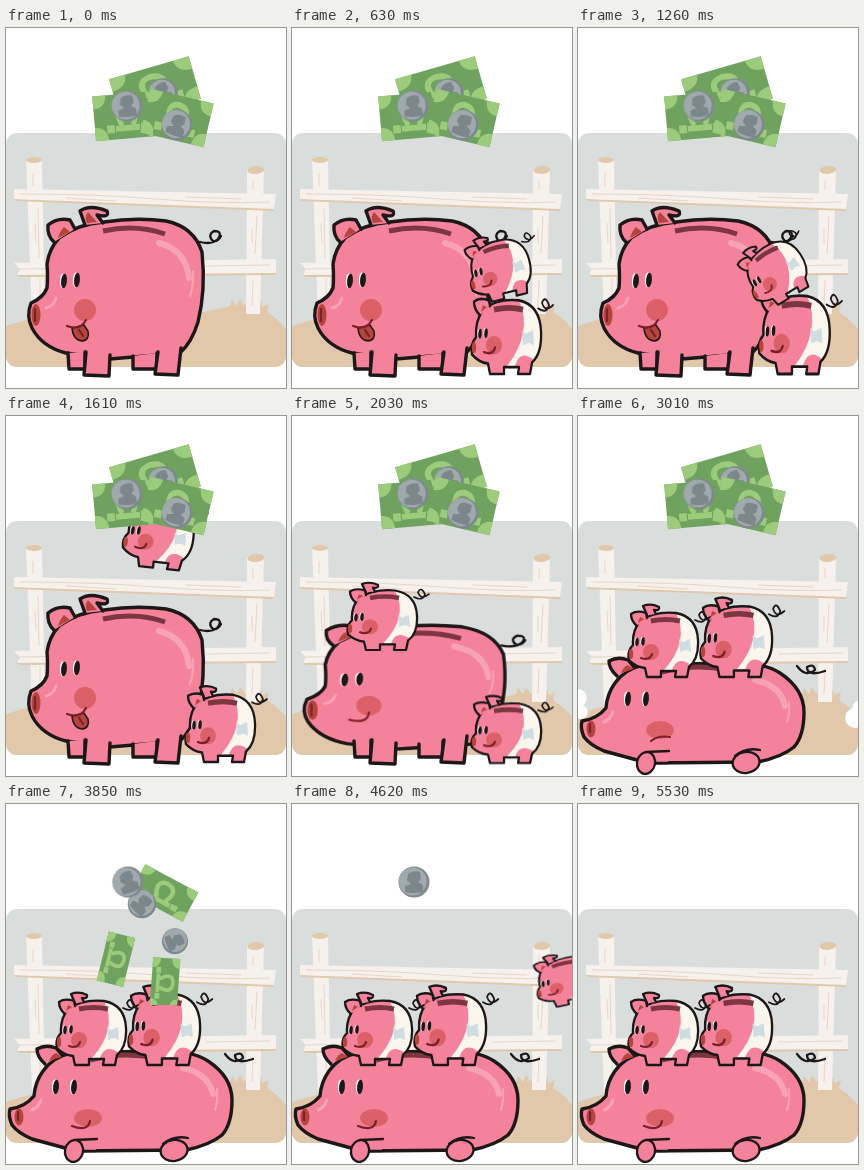
An HTML page that plays this animation: 280 by 360 pixels, repeating every 5.6 s.

```html
<!DOCTYPE html>
<html lang="en">
<head>
<meta charset="utf-8">
<title>Piggy banks</title>
<style>
html, body { margin: 0; width: 100%; height: 100%; overflow: hidden; background: #fff; }
svg { display: block; width: 100vw; height: 100vh; }
.ink { fill: none; stroke: #1d1718; stroke-width: 3.4; stroke-linecap: round; stroke-linejoin: round; }
.mom path { vector-effect: non-scaling-stroke; }
.thin { stroke-width: 2.3; }
.fine { stroke-width: 1.7; }
.skin { fill: #f5829b; }
.cheek { fill: #dc6068; }
.dark { fill: #b5443c; }
.slot { fill: none; stroke: #7c3640; stroke-width: 5; }
.shine { fill: none; stroke: #f7a3b5; stroke-linecap: round; }
.grin { fill: none; stroke: #7a2028; stroke-width: 2.2; stroke-linecap: round; }
.wood { fill: #f6f1ed; }
.sand { fill: #e1c8ab; }
.grain { fill: none; stroke: #e6d6c6; stroke-width: 1; }

.anim { animation: 5.6s linear infinite; }
.cut { animation-timing-function: step-end; }
.early { animation-name: early; }
.late { animation-name: late; }
.tongue { animation-name: tongue; }
.smile { animation-name: smile; }
.frown { animation-name: frown; }
.happy { animation-name: happy; }
.squash { animation-name: squash; transform-origin: 0 348px; }
.flop { animation-name: flop; transform-origin: 115px 352px; }
.one { animation-name: one; }
.two { animation-name: two; }
.three { animation-name: three; }
.puffL { animation-name: puffL; }
.puffR { animation-name: puffR; }
.n1 { animation-name: n1; } .n2 { animation-name: n2; } .n3 { animation-name: n3; }
.c1 { animation-name: c1; } .c2 { animation-name: c2; } .c3 { animation-name: c3; }

/* 1.25% is one 70 ms step */
@keyframes early { 0% { opacity: 1 } 46.25%, 100% { opacity: 0 } }
@keyframes late { 0% { opacity: 0 } 46.25%, 100% { opacity: 1 } }
@keyframes tongue { 0% { opacity: 1 } 32.5%, 100% { opacity: 0 } }
@keyframes smile { 0% { opacity: 0 } 32.5%, 100% { opacity: 1 } }
@keyframes frown { 0% { opacity: 1 } 61.25%, 100% { opacity: 0 } }
@keyframes happy { 0% { opacity: 0 } 61.25%, 100% { opacity: 1 } }

@keyframes squash {
  0%, 32.5% { translate: 0 0; scale: 1 1 }
  35% { translate: -28px 0; scale: 1.26 .8 }
  36.25%, 42.5% { translate: -14px 0; scale: 1.15 .885 }
  45%, 100% { translate: -20px 0; scale: 1.2 .86 }
}
@keyframes flop {
  0%, 46.25% { scale: 1.02 .9 }
  48.75% { scale: .99 1.05 }
  51.25%, 100% { scale: 1 1 }
}
@keyframes one {
  0% { translate: 330px 346px; scale: 1 1.15 }
  5% { translate: 262px 336px; scale: 1 1.15 }
  7.5% { translate: 232px 346px; scale: 1.06 1 }
  11.25% { translate: 215px 346px; scale: 1 1.15 }
  17.5% { translate: 222px 346px; scale: 1.03 1.08 }
  22.5% { translate: 217px 346px; scale: 1.02 1.22 }
  25% { translate: 215px 346px; scale: 1.06 .85 }
  28.75% { translate: 215px 346px; scale: 1 1.05 }
  36.25% { translate: 215px 347px; scale: 1 .93 }
  38.75% { translate: 215px 347px; scale: 1.12 .75 }
  40% { translate: 203px 290px; scale: .95 1.12; animation-timing-function: ease-out }
  42.5% { translate: 180px 186px; scale: 1 1; animation-timing-function: ease-in }
  45% { translate: 160px 234px; scale: 1 1.08 }
  46.25% { translate: 160px 262px; scale: 1.1 .82; animation-timing-function: ease-out }
  48.75% { translate: 160px 236px; scale: 1 1.08; animation-timing-function: ease-in }
  51.25% { translate: 160px 262px; scale: 1.1 .9 }
  53.75%, 100% { translate: 159px 261px; scale: 1.03 1.1 }
}
@keyframes two {
  0% { translate: 330px 270px; rotate: 0deg; scale: .9 }
  5% { translate: 262px 262px; rotate: 8deg; scale: .9 }
  7.5% { translate: 232px 276px; rotate: -6deg; scale: .9 }
  11.25% { translate: 215px 270px; rotate: -14deg; scale: .9 }
  17.5% { translate: 224px 274px; rotate: 6deg; scale: .9 }
  22.5% { translate: 213px 269px; rotate: -31deg; scale: .88 }
  25% { translate: 213px 284px; rotate: -10deg; scale: 1.08 .8; animation-timing-function: ease-out }
  28.75% { translate: 150px 152px; rotate: 6deg; scale: 1; animation-timing-function: ease-in }
  33.75% { translate: 92px 234px; rotate: 0deg; scale: .98 1.04 }
  35% { translate: 92px 242px; rotate: 0deg; scale: 1.12 .78 }
  36.25%, 42.5% { translate: 91px 234px; rotate: 0deg; scale: 1 .93 }
  45% { translate: 90px 238px; rotate: 0deg; scale: 1 }
  46.25% { translate: 87px 261px; rotate: 0deg; scale: 1.1 .82; animation-timing-function: ease-out }
  48.75% { translate: 87px 229px; rotate: 0deg; scale: 1 1.02; animation-timing-function: ease-in }
  51.25% { translate: 87px 261px; rotate: 0deg; scale: 1.08 .9 }
  53.75%, 100% { translate: 86px 261px; rotate: 0deg; scale: 1 }
}
@keyframes three {
  0%, 80% { translate: 345px 236px; rotate: -16deg; scale: .88 .72 }
  82.5% { translate: 280px 200px; rotate: -12deg; scale: .88 .72 }
  87.5% { translate: 150px 163px; rotate: 0deg; scale: .88 }
  90% { translate: 97px 166px; rotate: 0deg; scale: .88 }
  98.75%, 100% { translate: -50px 202px; rotate: -8deg; scale: .88 }
}
@keyframes puffL {
  0%, 46.24% { translate: 50px 330px; scale: 0 }
  46.25% { translate: 40px 326px; scale: .6 }
  53.75% { translate: 0 289px; scale: 1 }
  56.25%, 100% { translate: -24px 280px; scale: 1 }
}
@keyframes puffR {
  0%, 46.24% { translate: 220px 335px; scale: 0 }
  46.25% { translate: 225px 332px; scale: .6 }
  53.75% { translate: 283px 300px; scale: 1 }
  56.25%, 100% { translate: 306px 292px; scale: 1 }
}
@keyframes n1 {
  0%, 57.5% { translate: 149px 61px; rotate: -16deg; scale: 1.38 1.3 }
  68.75% { translate: 158px 89px; rotate: 28deg; scale: 1 .98; animation-timing-function: ease-in }
  77.5%, 100% { translate: 160px 235px; rotate: 90deg; scale: .84 .8 }
}
@keyframes n2 {
  0%, 57.5% { translate: 121px 88px; rotate: -5deg; scale: 1.1 1.32 }
  68.75% { translate: 110px 155px; rotate: 104deg; scale: .84 .8 }
  75%, 100% { translate: 89px 235px; rotate: 90deg; scale: .84 .8 }
}
@keyframes n3 {
  0%, 57.5% { translate: 171px 90px; rotate: 13deg; scale: 1.08 1.32 }
  68.75% { translate: 159px 179px; rotate: 94deg; scale: .84 .8 }
  72.5%, 100% { translate: 159px 235px; rotate: 90deg; scale: .84 .8 }
}
@keyframes c1 {
  0%, 57.5% { translate: 121px 78px; rotate: -4deg; opacity: 1 }
  68.75% { translate: 122px 78px; rotate: -20deg; opacity: 1 }
  77.5%, 85% { translate: 122px 78px; rotate: 0deg; opacity: 1; animation-timing-function: ease-in }
  88.74% { translate: 122px 118px; rotate: 0deg; opacity: 1 }
  88.75%, 100% { translate: 122px 118px; rotate: 0deg; opacity: 0 }
}
@keyframes c2 {
  0%, 57.5% { translate: 171px 97px; rotate: 18deg; scale: 1 }
  68.75% { translate: 169px 137px; rotate: 70deg; scale: .84 }
  73.75%, 100% { translate: 160px 220px; rotate: 130deg; scale: .84 }
}
@keyframes c3 {
  0%, 57.5% { translate: 157px 65px; rotate: -20deg; scale: .95 }
  68.75% { translate: 136px 100px; rotate: 45deg; scale: .92; animation-timing-function: ease-in }
  77.5%, 100% { translate: 90px 222px; rotate: 150deg; scale: .84 }
}
</style>
</head>
<body>
<svg viewBox="0 0 280 360">
  <defs>
    <clipPath id="card"><rect y="105" width="280" height="234" rx="11"/></clipPath>
    <clipPath id="above"><rect width="280" height="201"/></clipPath>

    <g id="eye">
      <ellipse cx="-1.2" rx="2.9" ry="7.4" fill="#fff"/>
      <ellipse rx="2.9" ry="7.2" fill="#1d1718" transform="rotate(5)"/>
    </g>

    <path id="babyBody" d="M-35-17Q-37-26-31-32Q-32-46-24-56Q-10-66 12-64Q33-60 34-37Q35-18 25-10L23 0H11L12-6H-3V0H-17L-19-9Q-28-10-35-17Z"/>
    <g id="baby">
      <path class="ink fine" d="M31-57Q40-52 42-60Q38-69 35-62Q38-53 46-60"/>
      <use href="#babyBody" class="skin"/>
      <path fill="#faf6ee" d="M12-64Q33-60 34-37Q35-18 27-12Q13-22 8-7L0-7Q26-36 12-64Z"/>
      <path fill="#cfdde2" d="M15-38L19-35L26-38L27-25L22-27L16-25Z"/>
      <use href="#babyBody" class="ink thin"/>
      <g class="ink thin">
        <path class="skin" style="fill:#f5829b" d="M-27-51Q-33-56-33-63Q-27-67-18-64L-17-59"/>
        <path class="skin" style="fill:#f5829b" d="M-17-62L-21-71Q-13-74-5-70Q-4-66-10-67L-8-63"/>
      </g>
      <path class="dark" d="M-26-54L-24-60L-20-58Z"/>
      <path class="slot" stroke-width="4" d="M-13-56Q2-59 16-56"/>
      <circle class="cheek" cx="-13" cy="-25" r="8"/>
      <ellipse class="dark" cx="-33" cy="-23" rx="2.2" ry="5"/>
      <use href="#eye" transform="translate(-27-35)scale(.6)"/>
      <use href="#eye" transform="translate(-21-35.500)scale(.6)"/>
      <path class="grin" stroke-width="2" d="M-23-19Q-14-16-12-23"/>
    </g>

    <g id="note">
      <rect x="-30" y="-17" width="60" height="34" fill="#6fa25f"/>
      <g fill="#9ccb7b">
        <path d="M-30-17h12q-1 10-12 10zM30-17h-12q1 10 12 10zM-30 17h12q-1-10-12-10zM30 17h-12q1-10 12-10z"/>
        <path d="M-19 6h7v6h-7zM12 6h7v6h-7z"/>
      </g>
      <path fill="none" stroke="#9ccb7b" stroke-width="4.500" d="M-5 7Q-14-9-1-10Q13-9 5 7M-11 9H11"/>
    </g>

    <g id="coin">
      <circle r="15.500" fill="#7f898d"/>
      <circle cx="-1.300" cy="-.5" r="14" fill="#a0aaad"/>
      <path fill="#7b878b" d="M-9 10L-9 4L-3 2L-7-2L-6-8Q-1-12 6-10L7-3L4 0L9 3L9 10Q0 12-9 10Z"/>
    </g>

    <g id="puff" fill="#fff">
      <circle cy="-7" r="9"/><circle cx="3" cy="7" r="7"/><circle cx="-6" cy="2" r="10"/>
    </g>
  </defs>

  <g clip-path="url(#card)">
    <rect y="105" width="280" height="234" fill="#d9dddb"/>
    <path class="sand" d="M0 298Q30 287 70 286L130 290Q190 288 224 278L226 272L231 278L234 271L238 277H250L256 274V279L263 276L261 284Q272 291 280 301V340H0Z"/>
    <path class="wood" d="M20 132H36L39 290H26ZM241 142H258L254 286H240Z"/>
    <ellipse class="sand" cx="28" cy="132" rx="8" ry="3"/>
    <ellipse class="sand" cx="250" cy="142" rx="8.500" ry="4" transform="rotate(-5 250 142)"/>
    <path class="sand" d="M8 171L268 180L268 183L10 173ZM9 246L270 244V247L14 249Z"/>
    <path class="wood" d="M8 161L270 166L268 181L8 171ZM8 235L270 231V245L11 247L14 241Z"/>
    <path class="grain" d="M14 166Q90 166 150 171T264 174M60 170L110 173M180 169L235 171M14 241L120 239M200 238L264 237M27 145V158M32 180L33 230M29 195L30 215M34 250V280M247 152V162M251 188L249 226M246 200V215M247 252L246 278"/>
  </g>

  <g class="anim puffL"><use href="#puff"/></g>
  <g class="anim puffR"><use href="#puff"/></g>

  <!-- mother, standing -->
  <g class="mom anim cut early">
    <g class="anim squash">
      <path class="ink thin" d="M194 214Q206 217 212 211Q217 203 208 203Q201 207 207 213Q212 214 215 208"/>
      <path class="ink" style="fill:#f5829b" d="M25 275Q37 270 41 260Q42 250 41 236Q43 221 53 210Q72 196 98 194Q130 189 160 193Q188 199 196 224Q200 262 192 294Q186 314 174 325L104 331L60 325Q36 319 26 300Q20 288 25 275Z"/>
      <path class="ink" style="fill:#f5829b" d="M48 214Q41 208 42 197Q52 189 64 192L69 201"/>
      <path class="dark" d="M52 210Q54 203 58 199L64 204Z"/>
      <path class="ink" style="fill:#f5829b" d="M79 197L74 183Q84 176 101 183Q104 190 91 187L97 195"/>
      <path class="dark" d="M81 195Q78 189 82 184L91 194Z"/>
      <path class="slot" d="M97 203Q130 196 159 206"/>
      <path class="shine" stroke-width="6" d="M153 215Q180 222 183 250"/>
      <path class="shine" stroke-width="2" d="M187 243Q188 256 184 268"/>
      <path class="shine" stroke-width="3" d="M40 280Q48 278 50 270"/>
      <circle class="cheek" cx="79" cy="282" r="11"/>
      <ellipse class="dark" cx="30" cy="287" rx="4.500" ry="11"/>
      <path class="grin" d="M29 281V293"/>
      <use href="#eye" x="58" y="253"/>
      <use href="#eye" x="71" y="252"/>
      <g class="anim cut tongue">
        <path class="dark" stroke="#1d1718" stroke-width="1.500" d="M66 300Q67 312 76 313Q84 312 82 303L78 297Z"/>
        <path class="grin" d="M61 298Q74 303 80 292M73 302L77 308"/>
      </g>
      <path class="grin anim cut smile" d="M62 298Q78 303 79 290"/>
    </g>
    <g class="ink" style="fill:#f5829b">
      <path d="M62 325L63 341H79V324"/>
      <path d="M127 328V341H151V325"/>
      <path d="M80 324L78 347L103 348L104 327"/>
      <path d="M152 324L149 346L172 347L175 320"/>
    </g>
  </g>

  <!-- mother, lying -->
  <g class="mom anim cut late">
    <g class="anim flop">
      <path class="ink thin" d="M219 250Q228 262 237 254Q236 247 229 251Q229 261 247 255"/>
      <path class="ink" style="fill:#f5829b" d="M4 305Q19 303 28 292Q29 278 37 267Q48 252 66 249L150 247Q185 246 202 257Q226 273 226 296Q226 320 216 331Q204 341 180 346L70 347Q44 340 26 335Q12 329 6 321Q2 312 4 305Z"/>
      <path class="ink" style="fill:#f5829b" d="M39 260Q31 253 31 245Q40 240 50 244L56 251"/>
      <path class="dark" d="M43 257Q46 250 50 249L56 253Z"/>
      <path class="slot" d="M84 256Q116 247 150 254"/>
      <path class="shine" stroke-width="6" d="M177 264Q203 270 207 290"/>
      <path class="shine" stroke-width="2" d="M211 285Q212 297 209 306"/>
      <path class="shine" stroke-width="3" d="M26 306Q33 303 35 296"/>
      <ellipse class="cheek" cx="82" cy="314" rx="14" ry="9"/>
      <ellipse class="dark" cx="13" cy="313" rx="4.500" ry="8.500"/>
      <path class="grin" d="M12 308V316"/>
      <use href="#eye" x="50" y="283"/>
      <use href="#eye" x="68" y="283"/>
      <path class="grin anim cut frown" d="M73 325Q80 319 92 321"/>
      <path class="grin anim cut happy" d="M66 322Q82 328 84 317"/>
      <g class="ink thin" style="fill:#f5829b">
        <path d="M91 335L68 336V358L77 347H90"/>
        <path d="M182 334Q168 331 157 340"/>
        <ellipse cx="68" cy="347" rx="9" ry="11" transform="rotate(12 68 347)"/>
        <ellipse cx="168" cy="346.500" rx="13.500" ry="10.500" transform="rotate(-8 168 346)"/>
      </g>
    </g>
  </g>

  <g class="anim one"><use href="#baby"/></g>
  <g class="anim two"><use href="#baby"/></g>

  <g clip-path="url(#above)">
    <g class="anim n1"><use href="#note"/></g>
    <g class="anim c3"><use href="#coin"/></g>
    <g class="anim n2"><use href="#note"/></g>
    <g class="anim n3"><use href="#note"/></g>
    <g class="anim c1"><use href="#coin"/></g>
    <g class="anim c2"><use href="#coin"/></g>
  </g>

  <g class="anim three"><use href="#baby"/></g>
</svg>
</body>
</html>
```
